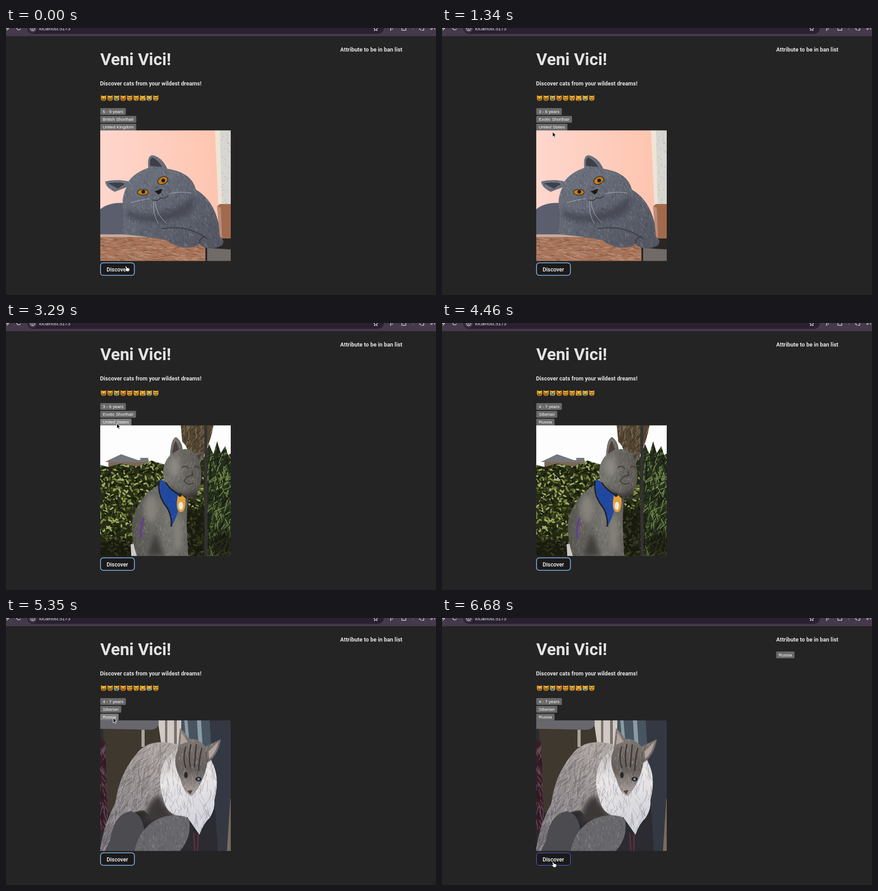
These frames come from a looping animation (949x590 px, 8 s). An HTML page:

```html
<!DOCTYPE html>
<html lang="en">
<head>
<meta charset="utf-8">
<title>Veni Vici!</title>
<style>
  html, body { margin: 0; width: 100%; height: 100%; overflow: hidden; background: #242424; }
  svg { display: block; }
  text { fill: #e3e3e3; font-family: Roboto, Inter, sans-serif; }
  .bold { font-size: 12.4px; font-weight: 700; }
  .tag text { fill: #fff; font: 9.65px "Liberation Sans", Arial, sans-serif; }
  .line { fill: none; stroke: #d8d0dc; stroke-width: 1.3; }
  .round { stroke-linecap: round; stroke-linejoin: round; }
  .photo { filter: url(#soft); }
  .shade { filter: url(#blur); }
  .whiskers { fill: none; stroke: #c6cbd4; stroke-width: .8; }
</style>
</head>
<body>
<svg width="949" height="590" viewBox="0 0 949 590">
  <defs>
    <clipPath id="frame"><rect x="208" y="226.300" width="288" height="288.500"/></clipPath>
    <filter id="soft"><feGaussianBlur stdDeviation=".6"/></filter>
    <filter id="blur" x="-50%" y="-50%" width="200%" height="200%"><feGaussianBlur stdDeviation="6"/></filter>
    <linearGradient id="pink"><stop stop-color="#fed7ce"/><stop offset="1" stop-color="#fec3ac"/></linearGradient>
    <linearGradient id="blueFur" x2="1" y2="1"><stop stop-color="#737986"/><stop offset="1" stop-color="#51545f"/></linearGradient>
    <linearGradient id="grayFur" x2="1"><stop stop-color="#56544f"/><stop offset=".5" stop-color="#777570"/><stop offset="1" stop-color="#5a5752"/></linearGradient>
    <linearGradient id="creamFur" x1="1" x2="0" y2="1"><stop stop-color="#b5aca7"/><stop offset="1" stop-color="#77737a"/></linearGradient>
    <linearGradient id="bibFur" x2=".2" y2="1"><stop stop-color="#bab4b2"/><stop offset=".4" stop-color="#e9e6e7"/><stop offset="1" stop-color="#d1d1da"/></linearGradient>
    <linearGradient id="maskFur" x2="0" y2="1"><stop stop-color="#88817c"/><stop offset=".6" stop-color="#655e5b"/><stop offset="1" stop-color="#b3a9a6"/></linearGradient>
    <radialGradient id="gold" cy=".35"><stop stop-color="#ffd64b"/><stop offset="1" stop-color="#cf8b1c"/></radialGradient>
  </defs>

  <rect width="949" height="590" fill="#242424"/>

  <g id="browser">
    <rect width="949" height="18" fill="#453a4b"/>
    <rect x="47" y="-14" width="787" height="27" rx="13" fill="#2a2031"/>
    <circle cx="59" cy="1" r="9" fill="#483d50"/>
    <g class="line round">
      <path d="M-4 1H6L2 5M23.500 0A4.600 4.600 0 0 0 32 2M59 1v2"/>
      <circle cx="59" cy="1" r="4.500"/>
      <path d="M811 0l3 2-1 4 3-2 3 2-1-4 3-2M873.500-2v7h9v-7M912-3h10v8h-4M912 2q3 0 3 3M937 0h6M937 3h4M946-2v5"/>
      <path d="M898-4v9" stroke="#6b5f71"/>
    </g>
    <text x="848" y="4" font-size="10" font-weight="700">j?</text>
    <text x="73" y="4.500" style="font:10.700px 'Liberation Sans',Arial,sans-serif">localhost:5173</text>
  </g>

  <text x="208" y="82" font-size="37" font-weight="700">Veni Vici!</text>
  <text x="207.500" y="126.500" class="bold">Discover cats from your wildest dreams!</text>
  <text x="737.500" y="52" class="bold">Attribute to be in ban list</text>
  <g id="emojis" class="round"></g>
  <g id="tags"></g>

  <g clip-path="url(#frame)">
    <g class="photo">
      <path d="M200 220H504V524H200Z" fill="url(#pink)"/>
      <path d="M461 220H480V400H469Z" fill="#eee5d7"/>
      <path id="plaster" d="M472 220H504V400H476Z" fill="#d8d6d0"/>
      <path d="M200 408Q222 383 263 387L270 460H200Z" fill="#5b5f6d"/>
      <path id="ledge" d="M200 460H450L446 524H200Z" fill="#a9755a"/>
      <path d="M200 456H360L380 462H200Z" fill="#c6a99c"/>
      <path d="M440 464H504V524H440Z" fill="#292725"/>
      <path d="M444 486L504 490V524H444Z" fill="#706b67"/>
      <path d="M466 394L472 389H504V465H473Z" fill="#a26a4c"/>
      <path d="M466 394L474 397L477 465H471Z" fill="#b98d7a"/>
      <path id="shorthair" fill="url(#blueFur)" d="M266 352L240 362Q219 352 219 339Q245 333 270 339Q285 319 314 309Q311 282 323 281Q344 285 356 311Q410 319 419 357Q457 379 469 431L472 461Q484 469 477 480Q462 489 444 486Q432 485 427 477Q414 487 392 485Q369 481 354 469Q310 460 257 456Q260 425 260 409Q252 379 266 352Z"/>
      <path class="shade" d="M270 402Q330 432 418 372Q420 410 383 420Q310 444 262 412Z" fill="#3c404b" opacity=".7"/>
      <path d="M225 343Q244 339 263 344L247 355ZM318 305Q316 288 323 286Q336 292 345 307Z" fill="#3e4049"/>
      <g fill="#c47d12" stroke="#302c2b" stroke-width="1.500">
        <ellipse cx="302" cy="363" rx="12" ry="6.500"/>
        <ellipse cx="346" cy="337" rx="11.500" ry="8" transform="rotate(-25 346 337)"/>
      </g>
      <g fill="#1d1a18"><circle cx="303" cy="362" r="4"/><circle cx="347" cy="337" r="4"/>
        <path d="M328 361L345 355L342 364L337 368Z"/></g>
      <path d="M323 380Q336 384 341 375Q351 379 358 370" fill="none" stroke="#363943" stroke-width="1.800"/>
      <path class="whiskers" d="M329 382Q331 412 354 431M326 382Q323 410 336 432M360 366Q389 360 409 365M317 377Q295 380 275 386"/>
      <path d="M343 444Q400 433 444 466M428 477Q425 465 440 460" fill="none" stroke="#393c45" stroke-width="2"/>
    </g>

    <g class="photo">
      <path d="M200 220H504V524H200Z" fill="#fdfdfd"/>
      <path id="trunk" d="M385 220H459Q453 260 437 290V330H410Q407 278 389 262Z" fill="#544530"/>
      <path d="M226 303H315V330H226Z" fill="#7d6754"/>
      <path d="M218 307L254 290L297 305L296 298H314V308Z" fill="#74777d"/>
      <path id="hedge" d="M200 312L226 318L253 311L290 317L321 304L350 313L440 300V524H200Z" fill="#262c16"/>
      <path id="palm" d="M436 300L448 268L458 290L466 262L474 288L484 272L490 292L504 284V524H436Z" fill="#29331f"/>
      <g class="shade" fill="#15190f" opacity=".75">
        <ellipse cx="240" cy="500" rx="50" ry="28"/><ellipse cx="420" cy="470" rx="26" ry="60"/><ellipse cx="480" cy="490" rx="28" ry="30"/>
      </g>
      <path d="M438 220H444L445 524H438Z" fill="#353231"/>
      <path d="M275 489L295 486L307 524H277Z" fill="#cbcac5"/>
      <path id="exotic" fill="url(#grayFur)" d="M362 292Q364 256 375 252Q387 259 390 279Q405 276 416 288L435 284Q434 300 428 311Q437 350 421 377L402 388Q397 427 400 475L402 518H290Q274 474 279 434Q290 393 320 369L349 350Q341 315 362 292Z"/>
      <g class="shade">
        <path d="M355 355Q390 395 424 365L420 390H370Z" fill="#34322e"/>
        <path d="M330 460L350 515H310Z" fill="#403e3a"/>
        <ellipse cx="372" cy="318" rx="12" ry="22" fill="#8b8882"/>
        <ellipse cx="320" cy="410" rx="15" ry="30" fill="#85827b"/>
        <ellipse cx="379" cy="465" rx="9" ry="40" fill="#85827b"/>
      </g>
      <path d="M367 289Q369 267 375 260L382 279ZM421 293L432 288L426 304Z" fill="#4c3f3c"/>
      <path class="round" d="M388 319Q396 313 403 321M416 319Q423 313 427 321M411 328V337Q399 337 393 349Q402 361 414 353" fill="none" stroke="#3d3935" stroke-width="2"/>
      <path id="harness" d="M339 346Q350 346 356 362L384 379Q385 415 366 448Q367 420 352 402Q336 378 339 346Z" fill="#2148a0"/>
      <path d="M338 348Q334 378 351 402Q366 420 365 450M352 352Q365 374 397 386" fill="none" stroke="#1d2024" stroke-width="3"/>
      <path d="M304 431Q296 450 298 476" fill="none" stroke="#633b9b" stroke-width="4"/>
      <path d="M379 382L384 377L389 381L396 387Q397 418 386 418Q376 416 377 397Z" fill="#e0a03a"/>
      <ellipse cx="386" cy="404" rx="5" ry="9" fill="#e9e7dc"/><circle cx="384" cy="380" r="4" fill="#232729"/>
    </g>

    <g class="photo">
      <path d="M200 220H504V524H200Z" fill="#2b2b31"/>
      <path d="M214 238H350V430H220Z" fill="#3f382e"/>
      <path id="curtain" d="M200 260L219 274L225 460L200 485Z" fill="#3b1e2b"/>
      <path d="M334 220H387V295H345Z" fill="#d0c9c4"/><path d="M351 220h5v75h-5M371 220h6v75h-6" fill="#77706e"/>
      <path d="M387 220H450L457 330H392Z" fill="#485561"/>
      <path d="M393 220h7l6 70h-7M421 220h9l5 80h-9" fill="#8c9ca5"/>
      <path d="M449 220H504V524H468Z" fill="#343842"/>
      <path d="M495 400L487 524H504V390Z" fill="#796b5c"/>
      <path d="M200 220H335Q343 244 320 247L229 245H200Z" fill="#68676d"/>
      <path d="M299 247h7v38h-7Z" fill="#aaa39a"/>
      <path d="M414 474l3 45M424 477l-1 42" stroke="#633036" stroke-width="3"/>
      <path id="siberian" fill="url(#creamFur)" d="M288 300Q316 263 378 279L390 340L400 450L355 438Q325 452 305 425Q265 425 236 485L222 520H206Q216 455 241 410Q250 344 288 300Z"/>
      <path class="shade" d="M306 450Q310 405 338 390Q350 415 378 441L345 453Z" fill="#3e3739"/>
      <path d="M230 491Q238 432 276 427Q303 432 306 478L286 524H214Z" fill="#4c4b50"/>
      <path id="bib" fill="url(#bibFur)" d="M376 288L350 315Q332 360 347 399Q352 429 378 437L400 440L427 479Q435 455 450 441Q462 422 460 402Q475 345 448 307Z"/>
      <path id="mask" fill="url(#maskFur)" d="M379 291L384 243Q398 257 405 267Q425 266 440 284L474 268Q469 303 444 320Q439 360 410 394Q394 391 384 354Q366 319 379 291Z"/>
      <path d="M384 280L387 253L401 273ZM447 295L469 273Q463 299 448 312Z" fill="#b1a29e"/>
      <path d="M397 284Q389 310 397 331M408 279Q402 306 407 329M420 279Q417 307 416 330M432 287Q426 314 425 338" fill="none" stroke="#3d3836" stroke-width="3"/>
      <g fill="#262a2e"><ellipse cx="397" cy="347" rx="4" ry="7"/><ellipse cx="425" cy="356" rx="7" ry="5"/></g>
      <circle cx="425" cy="356" r="2.500" fill="#8099ae"/>
      <path d="M400 382L412 380L407 390Z" fill="#564242"/>
      <path id="perch" d="M288 498Q307 449 353 438Q390 432 404 445Q411 485 382 517H283Z" fill="#68676b"/>
    </g>
  </g>

  <rect id="button" x="208.600" y="519" width="74.800" height="27.500" rx="6" fill="#1a1a1a"/>
  <text x="222" y="537.500" font-size="12.200" font-weight="500" style="fill:#fff">Discover</text>

  <path id="arrow" d="M0 0V11L2.600 8.800L4.500 12.700L6.300 11.900L4.500 8.100H8Z" stroke="#fff"/>
  <path id="hand" class="round" d="M-3.500-5Q-2-7-1-5L.5-1.500Q1.500-3 2.500-1.500Q4-2.500 4.500-.8Q6-1 6 .8Q6 4 4 6H-1Q-2.500 3-5.500 1Q-5-.8-2.300.6Z" fill="#fff" stroke="#111"/>
</svg>
<script>
const LOOP = 8000;
const $ = id => document.getElementById(id);

function add(parent, name, attrs) {
  const el = document.createElementNS('http://www.w3.org/2000/svg', name);
  for (const key in attrs) el.setAttribute(key, attrs[key]);
  return parent.appendChild(el);
}

function random(seed) {
  return () => (seed = seed * 16807 % 2147483647) / 2147483647;
}

// Fills a shape with short strokes around one direction, by default as light and dark hair.
function texture(id, length, angle, { spread = 70, width = 1, density = .022, tones = ['#fff3', '#0003'] } = {}) {
  const shape = $(id), { x, y, width: w, height: h } = shape.getBBox();
  const group = add(shape.parentNode, 'g', { 'clip-path': `url(#${id}Clip)` });
  shape.after(group);
  add(add(group, 'clipPath', { id: id + 'Clip' }), 'use', { href: '#' + id });

  const rnd = random(Math.round(w * h) * 7919);
  for (const stroke of tones) {
    let d = '';
    for (let n = w * h * density / tones.length; n > 0; n--) {
      const a = (angle + (rnd() - .5) * spread) * Math.PI / 180, l = length * (.5 + rnd());
      d += `M${(x + rnd() * w).toFixed(1)} ${(y + rnd() * h).toFixed(1)}` +
        `l${(Math.cos(a) * l).toFixed(1)} ${(Math.sin(a) * l).toFixed(1)}`;
    }
    add(group, 'path', { d, stroke, 'stroke-width': width, 'stroke-linecap': 'round' });
  }
}

texture('shorthair', 5, 65);
texture('exotic', 4, 90);
texture('siberian', 17, 120, { width: 1.5 });
texture('bib', 18, 88);
texture('mask', 7, 90);
texture('perch', 5, 70);
texture('plaster', 3, 0, { spread: 180 });
texture('ledge', 9, 4, { spread: 20, width: 1.5 });
texture('trunk', 9, 105, { width: 2 });
texture('curtain', 15, 82, { width: 2 });
texture('harness', 1, 30);
texture('hedge', 5, 30, { spread: 170, width: 3.5, density: .03,
  tones: ['#5d6d2c', '#20260f', '#7d8b42', '#3b4720', '#a5ad66', '#161b0c'] });
texture('palm', 24, -70, { spread: 110, width: 2, tones: ['#47602f', '#171d11', '#71844a', '#1f2818'] });

const FACE = {
  open: 'M-2.500-1v1M2.500-1v1',
  closed: 'M-4 0Q-2.500-2.500-1 0M1 0Q2.500-2.500 4 0',
  cross: 'M-4-2l3 1v1M4-2l-3 1v1',
  grin: 'M-3 2H3Q0 7-3 2', smirk: 'M-2 3Q1 5 3 2', kiss: 'M0 2Q2 3 0 3Q2 4 0 5', frown: 'M-2 4Q0 2 2 4',
  tears: 'M-4 1v2M4 1v2', hearts: 'M-2.700-1v.5M2.700-1v.5', paws: 'M-5 4V0M5 4V0'
};
const FACE_COLOURS = { tears: '#55b8ed', hearts: '#e72e3d', paws: '#df9b43' };

['open grin', 'closed grin', 'closed grin tears', 'grin hearts', 'cross smirk', 'closed kiss',
  'open frown paws', 'open frown tears', 'cross frown'].forEach((mood, i) => {
  const g = add($('emojis'), 'g', { transform: `translate(${215.3 + 14.4 * i} 155)`, fill: 'none' });
  add(g, 'path', { d: 'M-5.800-6.500L-2-4.800H2L5.800-6.500L6 0Q6 6 0 6Q-6 6-6 0Z', fill: 'url(#gold)' });
  for (const part of mood.split(' ')) {
    const colour = FACE_COLOURS[part];
    add(g, 'path', { d: FACE[part], stroke: colour || '#4c2c12', 'stroke-width': colour ? 3 : 1.2 });
  }
});

const TAG_HEIGHT = 15;

function makeTag(x, y) {
  const g = add($('tags'), 'g', { class: 'tag', transform: `translate(${x} ${y})` });
  const box = add(g, 'rect', { height: TAG_HEIGHT, rx: 2 });
  const label = add(g, 'text', { x: 5.5, y: 10.8 });
  let width = 0;
  return (text, pointer) => {
    if (label.textContent !== text) {
      label.textContent = text;
      width = text && label.getComputedTextLength() + 11;
      box.setAttribute('width', width);
    }
    box.setAttribute('fill', inside(pointer, x, y, width, TAG_HEIGHT) ? '#7e7e7e' : '#696969');
  };
}

function inside([px, py], x, y, w, h) {
  return px >= x && px <= x + w && py >= y && py <= y + h;
}

const tags = [0, 1, 2].map(row => makeTag(208, 177 + 17.3 * row));
const banned = makeTag(737.5, 74);
const photos = document.querySelectorAll('.photo');

const CATS = [
  { from: 0, photo: 0, facts: ['5 - 9 years', 'British Shorthair', 'United Kingdom'] },
  { from: 300, photo: 1490, facts: ['3 - 6 years', 'Exotic Shorthair', 'United States'] },
  { from: 4460, photo: 4910, facts: ['4 - 7 years', 'Siberian', 'Russia'] }
];
const BAN_AT = 5490;

// The pointer moves along quadratic curves, sampled in equal steps.
const STEP = 147;
const MOVES = [
  { at: -STEP, steps: 1, from: [267, 532], to: [267, 532] },
  { at: 150, steps: 7, from: [262, 510], bend: [40, -19], to: [244, 229.5] },
  { at: 3290, steps: 4, from: [244.5, 222], bend: [272, 631], to: [266, 536] },
  { at: 4320, steps: 7, from: [268, 510], to: [236.5, 220.5], power: 6 },
  { at: BAN_AT, steps: 3, from: [236.5, 220.5], to: [248, 533] },
  { at: 6230, steps: 3, from: [247, 552], to: [247, 545] }
];

function pointerAt(t) {
  const { at, steps, from, to, power = 1, bend } = MOVES.findLast(move => move.at <= t);
  const progress = Math.min(1, Math.floor((t - at + 10) / STEP) / steps);
  const p = 1 - (1 - progress) ** power;
  return from.map((a, i) => {
    const middle = bend ? bend[i] : (a + to[i]) / 2;
    return a * (1 - p) ** 2 + 2 * middle * p * (1 - p) + to[i] * p * p;
  });
}

function show(el, on) { el.style.display = on ? '' : 'none'; }

function draw(t) {
  const pointer = pointerAt(t);
  const onButton = inside(pointer, 208, 519, 76, 28);
  const { facts } = CATS.findLast(cat => cat.from <= t);
  const photo = CATS.findLastIndex(cat => cat.photo <= t);

  tags.forEach((set, i) => set(facts[i], pointer));
  banned(t >= BAN_AT ? 'Russia' : '', pointer);
  photos.forEach((el, i) => show(el, i === photo));

  const focused = t < BAN_AT;
  $('button').setAttribute('stroke', focused ? '#8fc0fb' : onButton ? '#646cff' : 'none');
  $('button').setAttribute('stroke-width', focused ? 1.6 : 1);

  show($('hand'), onButton);
  show($('arrow'), !onButton);
  $(onButton ? 'hand' : 'arrow').setAttribute('transform', `translate(${pointer})`);
}

const start = performance.now();
function tick() {
  draw((performance.now() - start) % LOOP);
  requestAnimationFrame(tick);
}
tick();
</script>
</body>
</html>
```
